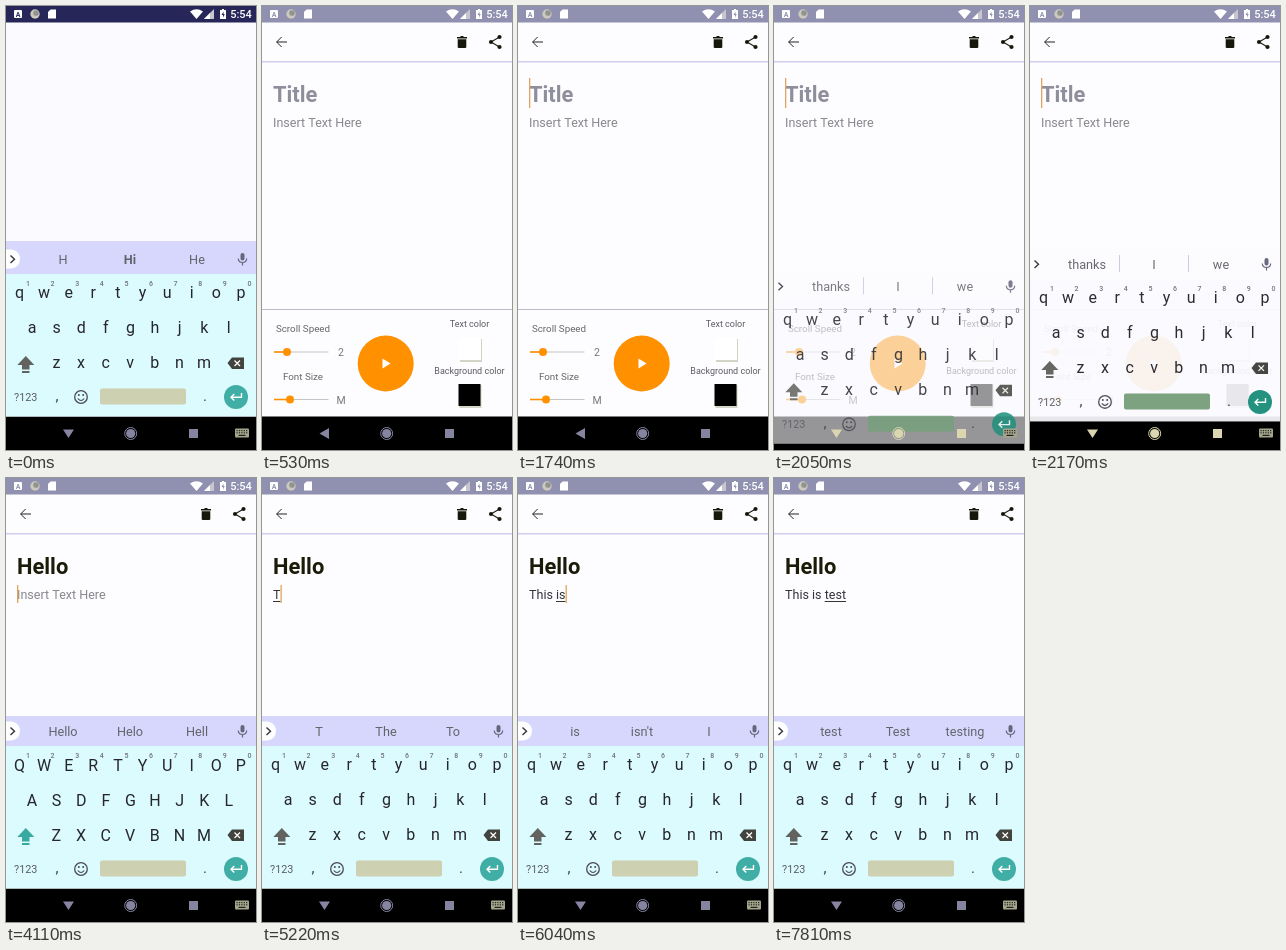
An HTML page with a canvas for the animation above (8300 ms loop, 250 px wide and 444 px high).

```html
<!DOCTYPE html>
<html lang="en">
<head>
<meta charset="utf-8">
<title>Text editor</title>
<style>
html, body { margin: 0; width: 100%; height: 100%; overflow: hidden; background: #fff; }
canvas { display: block; width: 250px; height: 444px; }
</style>
</head>
<body>
<canvas id="stage"></canvas>
<script>
const LOOP = 8300;
const canvas = document.getElementById('stage');
const c = canvas.getContext('2d');
const ratio = window.devicePixelRatio || 1;
canvas.width = 250 * ratio;
canvas.height = 444 * ratio;

// start time, title, body, suggestions, focused field, composing word, capitals
const states = [
  [0, '', '', 'H,Hi,He', '', '', 0],
  [320, '', '', 'thanks,I,we', '', '', 0],
  [1520, '', '', 'thanks,I,we', 'title', '', 0],
  [2630, 'H', '', 'H,Hi,He', 'title', 'H', 0],
  [2790, 'He', '', 'He,Hey,Hello', 'title', 'He', 0],
  [2960, 'Hel', '', 'Hel,Hello,Help', 'title', 'Hel', 0],
  [3120, 'Hell', '', 'Hell,Hello,Hells', 'title', 'Hell', 0],
  [3610, 'Hello', '', 'Hello,Helo,Hell', 'title', 'Hello', 0],
  [4020, 'Hello', '', 'Hello,Helo,Hell', 'body', '', 0],
  [4110, 'Hello', '', 'Hello,Helo,Hell', 'body', '', 1],
  [4560, 'Hello', '', 'I,The,Hey', '', '', 1],
  [5060, 'Hello', '', 'I,The,Hey', 'body', '', 1],
  [5130, 'Hello', 'T', 'T,The,To', 'body', 'T', 1],
  [5200, 'Hello', 'T', 'T,The,To', 'body', 'T', 0],
  [5460, 'Hello', 'Th', 'Th,The,This', 'body', 'Th', 0],
  [5560, 'Hello', 'Thi', 'Thi,This,Think', 'body', 'Thi', 0],
  [5670, 'Hello', 'This', 'This,Thus,Thistle', 'body', 'This', 0],
  [5830, 'Hello', 'This ', 'is,was,will', 'body', '', 0],
  [5940, 'Hello', 'This i', 'i,is,I', 'body', 'i', 0],
  [6040, 'Hello', 'This is', "is,isn't,I", 'body', 'is', 0],
  [6250, 'Hello', 'This is ', "is,isn't,I", 'body', '', 0],
  [6370, 'Hello', 'This is ', 'the,a,not', 'body', '', 0],
  [6530, 'Hello', 'This is te', 'the,a,not', 'body', 'te', 0],
  [6580, 'Hello', 'This is tes', 'te,the,ten', 'body', 'tes', 0],
  [6780, 'Hello', 'This is tes', 'tes,yes,test', 'body', 'tes', 0],
  [7270, 'Hello', 'This is test', 'test,Test,testing', 'body', 'test', 0],
  [7810, 'Hello', 'This is test', 'test,Test,testing', '', 'test', 0]
];

function ease(t, from, to) {
  const p = Math.min(1, Math.max(0, (t - from) / (to - from)));
  return 1 - (1 - p) ** 2;
}
function rect(x, y, w, h, color) {
  c.fillStyle = color;
  c.fillRect(x, y, w, h);
}
function round(x, y, w, h, r, color) {
  c.fillStyle = color;
  c.beginPath();
  c.roundRect(x, y, w, h, r);
  c.fill();
}
function disc(x, y, r, color) {
  c.fillStyle = color;
  c.beginPath();
  c.arc(x, y, r, 0, 7);
  c.fill();
}
function ring(x, y, r, color, width) {
  c.beginPath();
  c.arc(x, y, r, 0, 7);
  c.strokeStyle = color;
  c.lineWidth = width;
  c.stroke();
}
function fillPath(d, color) {
  c.fillStyle = color;
  c.fill(new Path2D(d));
}
function line(d, color, width = 1) {
  c.strokeStyle = color;
  c.lineWidth = width;
  c.stroke(new Path2D(d));
}
function text(s, x, y, size, color, align = 'center', weight = 400) {
  c.font = `${weight} ${size}px Roboto, sans-serif`;
  c.textAlign = align;
  c.fillStyle = color;
  c.fillText(s, x, y);
}

function statusBar(color) {
  rect(0, 0, 250, 16.5, color);
  round(8, 4, 8, 8, 1, '#fff');
  text('A', 12, 10.6, 7, color, 'center', 700);
  disc(29, 8, 4.7, '#c9c9bd');
  disc(30, 7, 2.8, '#93938f');
  fillPath('M44.5 3.5H50V12.5H42V6Z', '#fff');
  fillPath('M184 5.5Q190.5 1 197 5.5L190.5 13Z', '#fff');
  fillPath('M198 13L208 3V13Z', '#c6c6cc');
  fillPath('M198 13L204 7V13Z', '#fff');
  fillPath('M214 4H216V3H218V4H220V13H214Z', '#fff');
  fillPath('M217.5 5.5L215.5 9H217V11.5L218.8 8H217.5Z', color);
  text('5:54', 235, 12.2, 11, '#fff', 'center', 500);
}

function field(content, hint, y, size, weight, word, focused, top, bottom) {
  const dark = weight === 700 ? '#1b1b08' : '#34343a';
  text(content || hint, 11, y, size, content ? dark : weight === 700 ? '#8e8e9c' : '#88888e', 'left', weight);
  const width = content ? c.measureText(content).width : 0;
  if (word) {
    const w = c.measureText(word).width;
    rect(11 + width - w, y + 2, w, 1, dark);
  }
  if (focused) rect(11 + width, top, 1.3, bottom - top, '#e0a55a');
}

function slider(y, knob, label, value) {
  text(label, 41, y - 20, 9.8, '#67676c');
  rect(12, y - .5, 54.5, 1, '#c5c5c9');
  rect(12, y - .8, knob - 12, 1.6, '#ff9100');
  disc(knob, y, 4, '#ff9100');
  text(value, 79, y + 4, 10.5, '#77777c');
}

function swatch(x, y, color) {
  rect(x + 1, y + 1, 22, 23, '#d4d4c6');
  rect(x, y, 22, 22, color);
}

function editor(s) {
  const [, title, body, , focus, word] = s;
  rect(0, 0, 250, 411, '#fdfdff');
  statusBar('#9090b0');
  line('M25 36H14.8M19.6 31L14.6 36L19.6 41', '#222', 1);
  fillPath('M195 31H198L199 30H201L202 31H205V32.5H195ZM195.7 33.3H204.3V41Q204.3 42 203.3 42H196.7Q195.7 42 195.7 41Z', '#18180a');
  line('M237.5 31L229 36L237.5 41', '#222', 1.2);
  [[237.5, 31], [229, 36], [237.5, 41]].forEach(([x, y]) => disc(x, y, 2.1, '#18180a'));
  rect(0, 55, 250, 1.5, '#d0d0ee');
  const bodyWord = body && word;
  field(title, 'Title', 96, 21.9, 700, bodyWord ? '' : word, focus === 'title', 72, 102);
  field(body, 'Insert Text Here', 121, 12.55, 400, bodyWord, focus === 'body', 107, 125);
  rect(0, 303, 250, 1, '#bcbcca');
  slider(346, 25, 'Scroll Speed', '2');
  slider(393.5, 28, 'Font Size', 'M');
  disc(123.7, 357.5, 28, '#ff9100');
  fillPath('M120.5 352.5V362.5L128.5 357.5Z', '#fff');
  text('Text color', 207.5, 320.5, 9, '#5c5c62');
  swatch(197, 332, '#fff');
  text('Background color', 207.5, 368, 9, '#5c5c62');
  swatch(196.5, 378, '#000');
}

function keyboard(s, alpha, offset, barTop) {
  const moving = offset > .5, caps = s[6];
  c.save();
  c.globalAlpha = alpha;
  c.translate(0, offset);
  rect(0, barTop, 250, 268 - barTop, moving ? '#fcfcff' : '#d7d7fd');
  rect(0, 268, 250, 142.5, moving ? '#fafaff' : '#dbfbfe');

  // glyphs become visible sooner than the sheet behind them
  c.globalAlpha = alpha ** .3;
  if (moving) [89, 158].forEach(x => rect(x, 244, 1, 17, '#c9c9e8'));
  else round(-10, 243.5, 24, 19, 9, '#fff');
  line('M4.5 249.5L8.5 253.3L4.5 257', '#33333b', 1.4);
  s[3].split(',').forEach((w, i) =>
    text(w, 57 + 67 * i, 257.8, 12.7, '#64646c', 'center', w === 'Hi' ? 700 : 400));
  round(234.5, 247, 4, 7.5, 2, '#66667c');
  line('M232.3 252.5Q232.5 256.5 236.5 256.5Q240.5 256.5 240.7 252.5M236.5 256.5V259.5', '#66667c', 1.2);

  const rows = [['qwertyuiop', 13.5, 292], ['asdfghjkl', 26, 327], ['zxcvbnm', 50.4, 362]];
  rows.forEach(([letters, x, y]) => [...letters].forEach((k, i) =>
    text(caps ? k.toUpperCase() : k, x + 24.6 * i, caps ? y + .8 : y, 16, '#26262c')));
  [...'1234567890'].forEach((k, i) => text(k, 22 + 24.6 * i, 280.2, 7, '#70707a', 'center', 500));

  fillPath('M19.8 350L28.3 359H23.5V363.5H16V359H11.3ZM16 365H23.5V367H16Z', caps ? '#38aaa0' : '#62625e');
  fillPath('M221.5 357L226 351.5H238V363H226Z', '#42423e');
  line('M228.5 354.5L234 360M234 354.5L228.5 360', '#fff', 1.2);
  text('?123', 19.7, 394.8, 10.8, '#5c5c64');
  text(',', 51, 395, 15, '#3e3e46');
  ring(75, 391, 6.3, '#4a4a52', 1.3);
  disc(72.8, 389, 1, '#4a4a52');
  disc(77.2, 389, 1, '#4a4a52');
  line('M71.8 392.5Q75 396.5 78.2 392.5', '#4a4a52', 1.2);
  round(94, 382.5, 86, 16, 2, moving ? '#79a07c' : '#ced0b2');
  text('.', 199, 395, 15, '#3e3e46');
  disc(230, 391, 12, moving ? '#1f8f7c' : '#41aea5');
  line('M235.5 387V391.3H225M228.3 388L225 391.3L228.3 394.6', '#fff', 1.4);
  c.restore();
}

function navIcons(open, fading) {
  const color = fading ? '#d9d6b0' : '#8585a0';
  fillPath(open ? 'M57 423.5H68L62.5 432Z' : 'M67 422V433L57.5 427.5Z', color);
  disc(124.7, 427.5, 4.6, color);
  ring(124.7, 427.5, 6, color, 1);
  rect(183, 423, 9, 9, color);
  if (!open) return;
  round(229, 422.5, 14, 9, 1, '#a5a58c');
  for (let i = 0; i < 10; i++) rect(230.5 + i % 5 * 2.4, 424 + (i / 5 | 0) * 2.2, 1.2, 1.2, '#222');
  rect(232.5, 428.8, 7, 1.2, '#222');
}

function draw(t) {
  const s = states.findLast(state => state[0] <= t);
  c.setTransform(ratio, 0, 0, ratio, 0, 0);
  const enter = ease(t, 40, 320);
  if (enter < 1) {
    rect(0, 0, 250, 411, '#fbfbff');
    statusBar('#262658');
  }
  if (enter > 0) {
    c.save();
    c.globalAlpha = enter;
    c.translate(0, 30 * (1 - enter));
    editor(s);
    c.restore();
  }
  rect(0, 410.5, 250, 33.5, '#000');
  const rise = ease(t, 1930, 2260);
  const shown = t < 1000 ? 1 - enter : rise;
  if (shown > 0) keyboard(s, shown, 68 * (1 - shown), t < 320 ? 235 : 238);
  navIcons(shown > 0, shown > 0 && shown < 1);
}

const start = performance.now();
function tick() {
  draw((performance.now() - start) % LOOP);
  requestAnimationFrame(tick);
}
tick();
</script>
</body>
</html>
```
